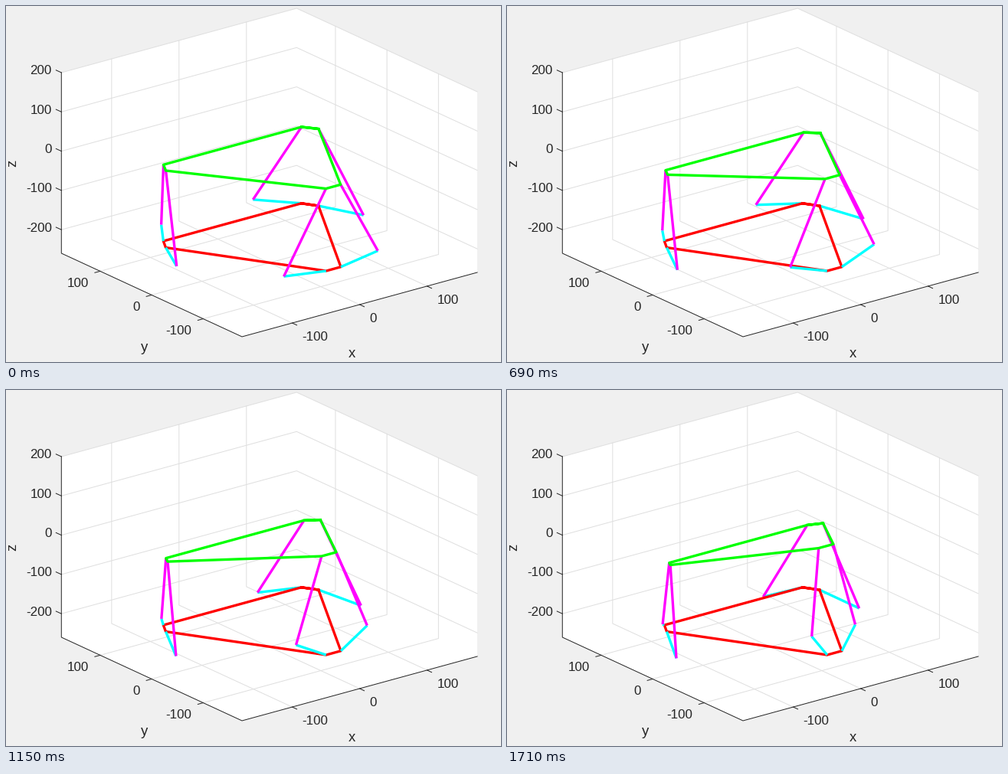
Animation of 646x465 px, one loop 2010 ms. Source, as a matplotlib script:

```python
import numpy as np
import matplotlib.pyplot as plt
from matplotlib.animation import FuncAnimation

W, H, DPI = 646, 465, 100
PX = 72 / DPI
INK, GRID = "#262626", "#dfdfdf"
TICK_MS, LOOP_MS = 10, 2010

# Parallel view: screen offset in pixels for one unit along x, y and z
ORIGIN = np.array([343.65, 202.1])
VIEW = np.array([[0.8797, -0.2407], [-0.6723, -0.3109], [0, -0.513]])
XM, YM, ZLO, ZHI = 174.5, 175.3, -260, 200

# Hexapod: joint radius, crank and rod lengths, base height
RADIUS, CRANK, ROD, BASE_Z = 125, 60, 207.5, -200
TILT = np.radians([4.3, 29.8])
STEPS, STEP_MS = 22, 76.6

fig = plt.figure(figsize=(W / DPI, H / DPI), dpi=DPI, facecolor="#f0f0f0")
ax = fig.add_axes([0, 0, 1, 1])
ax.set_xlim(0, W)
ax.set_ylim(H, 0)
ax.axis("off")


def project(pts):
    return ORIGIN + np.asarray(pts, float) @ VIEW


def line(pts, color, width, z, **kw):
    return ax.plot(*np.transpose(pts), color=color, lw=width * PX,
                   zorder=z, **kw)[0]


def label(x, y, s, size=17, ha="center", rot=0):
    ax.text(x, y, str(s), family="Liberation Sans", fontsize=size * PX,
            color=INK, ha=ha, va="baseline", rotation=rot,
            rotation_mode="anchor")


def gridline(pts):
    line(project(pts), GRID, 1, 1)


def tick(at, mark, text, value, ha):
    p = project(at)
    line([p, p + mark], INK, 1, 2)
    label(*(p + text), value, ha=ha)


walls = [(-XM, YM, ZLO), (-XM, YM, ZHI), (XM, YM, ZHI),
         (XM, -YM, ZHI), (XM, -YM, ZLO), (-XM, -YM, ZLO)]
ax.fill(*project(walls).T, color="white", lw=0, zorder=0)

for v in (-100, 0, 100):
    gridline([(v, YM, ZHI), (v, YM, ZLO), (v, -YM, ZLO)])
    tick((v, -YM, ZLO), (6, 2.8), (13, 23.4), v, "left")
    gridline([(XM, v, ZHI), (XM, v, ZLO), (-XM, v, ZLO)])
    tick((-XM, v, ZLO), (-7, 1.9), (-15, 20.6), v, "right")
for v in range(-200, 201, 100):
    gridline([(-XM, YM, v), (XM, YM, v), (XM, -YM, v)])
    tick((-XM, YM, v), (-7, -3.2), (-12.5, 2.3), v, "right")
line(project([walls[i] for i in (1, 0, 5, 4)]), INK, 1, 2)

label(451, 458.5, "x", 18.5)
label(181, 451.3, "y", 18.5)
label(12.8, 205, "z", 18.5, rot=90)

# Joints sit in pairs 5 degrees either side of three arms;
# each crank swings in the vertical plane tangent at its joint
side = np.tile([1, -1], 3)
ang = np.radians(np.repeat([30, -90, -210], 2) + 5 * side)
hexagon = RADIUS * np.column_stack([np.cos(ang), np.sin(ang), 0 * ang])
swing = side[:, None] * np.column_stack([-np.sin(ang), np.cos(ang), 0 * ang])
UP = np.array([0, 0, 1])
base = hexagon + BASE_Z * UP


def plate_at(tilt):
    x, y, _ = hexagon.T
    return np.column_stack([x, y * np.cos(tilt), -y * np.sin(tilt)])


def tips_at(plate):
    """Crank tips that keep every rod at its fixed length."""
    leg = plate - base
    e = 2 * CRANK * leg[:, 2]
    f = 2 * CRANK * (leg * swing).sum(axis=1)
    g = (leg ** 2).sum(axis=1) - ROD ** 2 + CRANK ** 2
    a = (np.arcsin(g / np.hypot(e, f)) - np.arctan2(f, e))[:, None]
    return base + CRANK * (np.cos(a) * swing + np.sin(a) * UP)


def ring(pts):
    return project(np.vstack([pts, pts[:2]]))


def bar(color, z):
    return line(np.zeros((2, 2)), color, BOLD, z, solid_capstyle="butt")


BOLD = 3.33
line(ring(base), "red", BOLD, 5, solid_joinstyle="round")
plate_line = line(ring(hexagon), "lime", BOLD, 8, solid_joinstyle="round")
# the first two legs stand behind the base outline, the others before it
cranks = [bar("cyan", 3 if i < 2 else 6) for i in range(6)]
rods = [bar("magenta", 4 if i < 2 else 7) for i in range(6)]


def draw(n):
    k = min(int(n * TICK_MS / STEP_MS), STEPS)
    plate = plate_at(TILT[0] + (TILT[1] - TILT[0]) * k / STEPS)
    tips = tips_at(plate)
    plate_line.set_data(*ring(plate).T)
    for i in range(6):
        cranks[i].set_data(*project([base[i], tips[i]]).T)
        rods[i].set_data(*project([plate[i], tips[i]]).T)
    return [plate_line, *cranks, *rods]


anim = FuncAnimation(fig, draw, frames=LOOP_MS // TICK_MS, interval=TICK_MS,
                     init_func=lambda: draw(0), repeat=True, repeat_delay=0)
plt.show()
```
